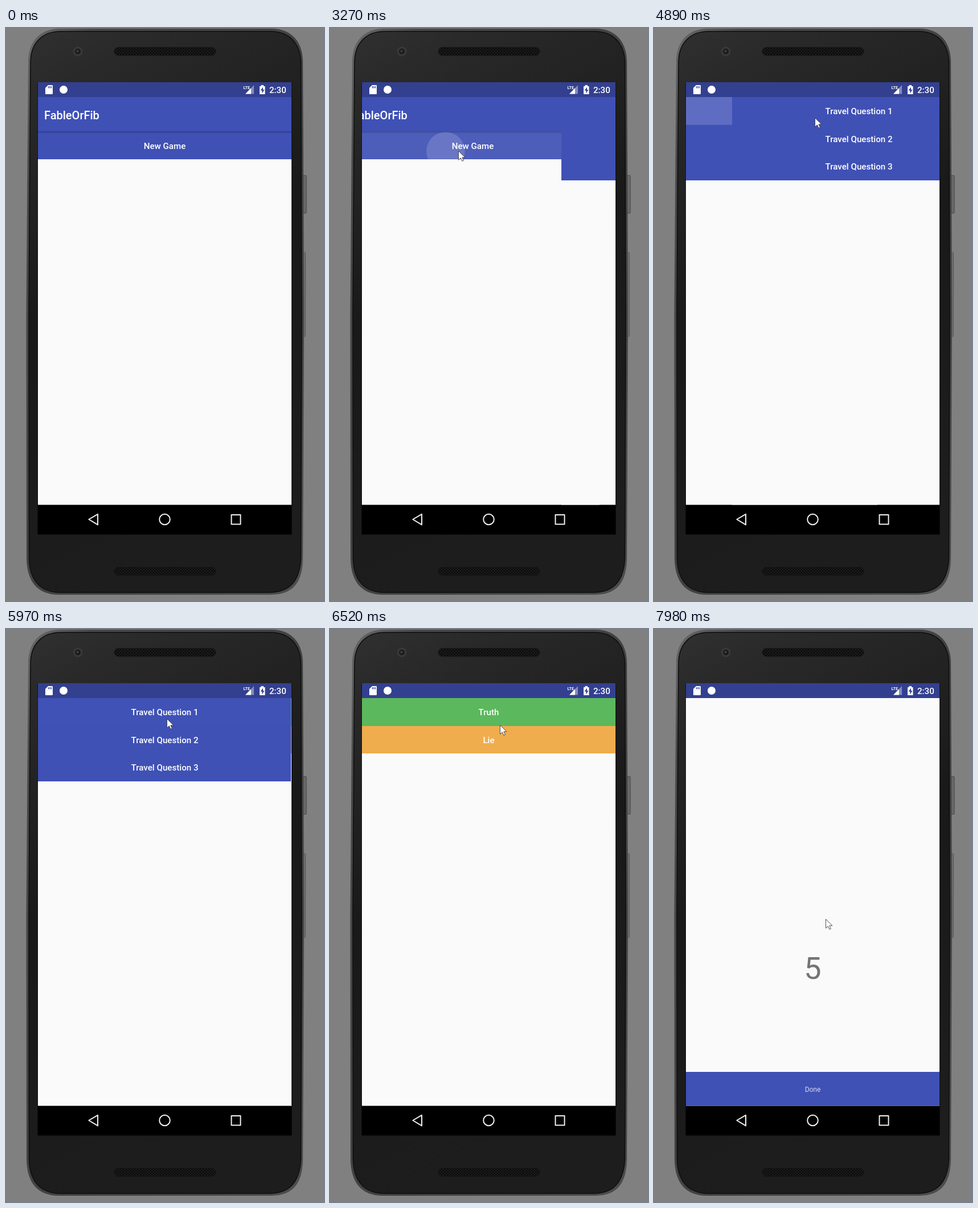
These frames come from a looping animation (558 px wide and 1004 px high, 8000 ms). An HTML page:

```html
<!DOCTYPE html>
<html lang="en">
<head>
<meta charset="utf-8">
<title>Quiz app</title>
<style>
html, body { margin: 0; width: 100%; height: 100%; overflow: hidden; background: #808080; }
svg { display: block; width: 558px; height: 1004px; }
text { font: 500 15.14px Roboto, sans-serif; fill: #fff; }
.mid { text-anchor: middle; }
.title { font-size: 20px; }
.count { font-size: 54px; font-weight: 400; fill: #737378; }
.done { font-size: 12px; font-weight: 400; fill: #d3d7ef; }
.lte { font-size: 7px; font-weight: 700; }
#pages rect { shape-rendering: crispEdges; }
</style>
</head>
<body>
<svg viewBox="0 0 558 1004">
  <defs>
    <linearGradient id="rim" x2="1" y2="1">
      <stop stop-color="#6a6a6a"/><stop offset=".12" stop-color="#484848"/>
      <stop offset=".6" stop-color="#404040"/><stop offset="1" stop-color="#4c4c4c"/>
    </linearGradient>
    <linearGradient id="face" x2=".25" y2="1">
      <stop stop-color="#303030"/><stop offset=".12" stop-color="#292929"/>
      <stop offset=".5" stop-color="#191919"/><stop offset="1" stop-color="#1d1d1d"/>
    </linearGradient>
    <linearGradient id="shade" x2="0" y2="1">
      <stop stop-opacity=".26"/><stop offset="1" stop-opacity="0"/>
    </linearGradient>
    <pattern id="mesh" width="5" height="5" patternUnits="userSpaceOnUse">
      <rect width="5" height="5" fill="#1c1c1c"/>
      <circle cx="1.2" cy="1.2" r="1.2" fill="#050505"/><circle cx="3.7" cy="3.7" r="1.2" fill="#050505"/>
    </pattern>
    <clipPath id="view"><rect x="56" y="121" width="445" height="714.5"/></clipPath>
  </defs>

  <g id="phone">
    <rect x="521" y="258.500" width="6" height="66" rx="1" fill="#686868" stroke="#484848"/>
    <rect x="521" y="393.500" width="4.500" height="147" rx="1" fill="#707070" stroke="#585858"/>
    <path d="M39 60C39 25 58 1 95 1H465C502 1 521 25 521 60L523 500 521 930C520 970 505 993 465 993H93C55 993 37 970 36 930L35.500 500Z" fill="url(#rim)"/>
    <path d="M43 61C43 28 62 6 96 6H464C498 6 517 28 517.500 61L519 500 517.500 928C516 965 500 989 463 989H95C58 989 41 965 40.500 928L40 500Z" fill="url(#face)" stroke="#0d0d0d" stroke-width="1.500"/>
    <g fill="url(#mesh)" stroke="#121212">
      <rect x="190" y="34" width="178" height="14" rx="7"/>
      <rect x="190" y="945" width="178" height="14" rx="7"/>
    </g>
    <circle cx="126" cy="41" r="8.500" fill="#383838"/>
    <circle cx="126" cy="41" r="5" fill="#1c1c1c"/>
    <circle cx="125.500" cy="40.500" r="2" fill="#404040"/>
    <rect x="55.500" y="95" width="446" height="792.500"/>
  </g>

  <g id="status" fill="#fff">
    <rect x="56" y="95" width="445" height="26" fill="#33408f"/>
    <path d="M74 100H81Q82 100 82 101V115Q82 116 81 116H70Q69 116 69 115V105Z"/>
    <path d="M74.500 102V105.500M77 102V105.500M79.500 102V105.500" stroke="#33408f" stroke-width="1.300"/>
    <circle cx="101" cy="108" r="7"/>
    <text class="lte" x="416.500" y="107">LTE</text>
    <path d="M435 100V115.500H420Z" opacity=".4"/>
    <path d="M430 105.200V115.500H420Z"/>
    <path d="M445 102H447.500V100H452V102H454.500V116H445Z"/>
    <path d="M451 103.500 446.500 109.500H449.300V114.500L453.500 108.300H451Z" fill="#33408f"/>
    <text x="462" y="114">2:30</text>
  </g>

  <g id="pages" clip-path="url(#view)"></g>

  <g fill="none" stroke="#f0f0f0" stroke-width="2" stroke-linejoin="round">
    <path d="M145.300 861 161 851.800V870.400Z"/>
    <circle cx="278.500" cy="861" r="9.300"/>
    <rect x="395.500" y="853" width="16" height="16.500"/>
  </g>
  <path id="cursor" d="M.5.5V16.300L4.300 12.700 6.900 18.300 9.400 17.200 6.900 11.800H12Z" fill="#fff" stroke="#333" stroke-width=".85"/>
</svg>

<script>
const LOOP = 8000, LEFT = 56, WIDTH = 445, TOP = 121, BAR = 181, ROW = 48.67, MIDDLE = 278.5;
const BLUE = '#3f51b5', GREEN = '#5cb85c', ORANGE = '#f0ad4e';
const $ = id => document.getElementById(id);

// The screen refreshes only in these spans: [first, last, count].
const spans = [[90, 250, 3], [2110, 2420, 5], [2650, 2960, 5], [3270, 3730, 7],
  [3960, 4430, 7], [4680, 5130, 7], [5970, 6750, 11], [6840, 6910, 2],
  [7150, 7750, 9], [7980, 7980, 1]];

// Pointer path: [time, x, y].
const path = [[90, 388, 836], [170, 316, 676], [250, 268, 587],
  [2110, 288, 527], [2265, 218, 355], [2420, 163, 259],
  [2650, 174, 252], [2805, 209, 229], [2960, 222, 218],
  [3960, 232, 209], [4200, 280, 158], [4430, 282, 157],
  [6440, 282, 157], [6516, 298, 168], [6594, 311, 184], [6750, 323, 201],
  [6840, 323, 202], [6910, 323, 203],
  [7600, 323, 203], [7675, 316, 300], [7750, 298, 439], [7980, 301, 508]];

// Each push: start time, touch point and the top of the touched row.
const pushes = [
  { start: 3218, x: 222, y: 218, row: BAR },
  { start: 4635, x: 282, y: 157, row: TOP },
  { start: 5968.5, x: 282, y: 157, row: TOP },
  { start: 7110, x: 323, y: 203, row: TOP + ROW }];

const box = (y, h, fill) =>
  `<rect x="${LEFT}" y="${y}" width="${WIDTH}" height="${h}" fill="${fill}"/>`;
const label = (text, y, cls = '') =>
  `<text class="mid ${cls}" x="${MIDDLE}" y="${Math.round(y)}">${text}</text>`;
const button = (text, y, fill = BLUE) => box(y, ROW, fill) + label(text, y + 30);
const list = (names, fills = []) =>
  names.map((name, i) => button(name, TOP + i * ROW, fills[i])).join('');

const contents = [
  button('New Game', BAR + .6) + box(TOP, BAR - TOP, BLUE) + box(BAR, 1, BLUE) + box(BAR, 4, 'url(#shade)') +
    '<text class="title" x="67" y="159.500">FableOrFib</text>',
  list(['Travel', 'Food', 'Hobby']),
  list(['Travel Question 1', 'Travel Question 2', 'Travel Question 3']),
  list(['Truth', 'Lie'], [GREEN, ORANGE]),
  label('5', 613, 'count') + box(775.5, 60, BLUE) + label('Done', 811, 'done')];

$('pages').innerHTML = contents.map((content, i) => {
  const push = pushes[i];
  const ripple = push ? `<clipPath id="row${i}">${box(push.row, ROW, BLUE)}</clipPath>
    <g clip-path="url(#row${i})">${box(push.row, ROW, '#fff')}<circle fill="#fff"/></g>` : '';
  return `<g>${box(TOP, 715, '#fafafa')}${content}${ripple}</g>`;
}).join('');

const pages = [...$('pages').children];
const ripples = pages.slice(0, -1).map(page => page.lastElementChild);

const clamp = v => Math.max(0, Math.min(1, v));
const mix = (a, b, k) => a + (b - a) * k;

function refreshTime(t) {
  let shown = 0;
  for (const [first, last, count] of spans) {
    if (t < first) break;
    const gap = (last - first) / (count - 1) || 1;
    shown = Math.min(last, first + Math.floor((t - first) / gap + 1e-6) * gap);
  }
  return shown;
}

// Damped spring (tension 200, friction 26, start speed 1.5), clamped at its goal.
function spring(s) {
  if (s <= 0) return 0;
  if (s >= .483) return 1;
  const w = Math.sqrt(31);
  return 1 - Math.exp(-13 * s) * (Math.cos(w * s) + 11.5 / w * Math.sin(w * s));
}

function pointer(t) {
  const i = path.findIndex(key => key[0] >= t - .01);
  const [tb, xb, yb] = path[i], [ta, xa, ya] = path[Math.max(0, i - 1)];
  const k = tb > ta ? clamp((t - ta) / (tb - ta)) : 1;
  return [Math.round(mix(xa, xb, k)), Math.round(mix(ya, yb, k))];
}

function drawRipple(group, push, s) {
  const [glow, circle] = group.children;
  const fade = clamp(s / .05) * clamp(1 - (s - .1) / .35);
  const k = clamp(s / .33);
  glow.setAttribute('opacity', .07 * fade);
  circle.setAttribute('opacity', .155 * fade);
  circle.setAttribute('cx', mix(push.x, MIDDLE, k));
  circle.setAttribute('cy', mix(push.y, push.row + ROW / 2, k));
  circle.setAttribute('r', Math.max(0, 650 * s));
}

function draw(now) {
  const t = refreshTime(now % LOOP);
  const ages = pushes.map(push => (t - push.start) / 1000);
  pages.forEach((page, i) => {
    const enter = i ? spring(ages[i - 1]) : 1;
    const leave = i < pushes.length ? spring(ages[i]) : 0;
    const shift = Math.round(WIDTH * (1 - enter) - .3 * WIDTH * leave);
    page.style.display = enter > 0 && leave < 1 ? '' : 'none';
    page.setAttribute('transform', `translate(${shift})`);
  });
  ripples.forEach((group, i) => drawRipple(group, pushes[i], ages[i]));
  $('cursor').style.display = t < 90 ? 'none' : '';
  $('cursor').setAttribute('transform', `translate(${pointer(t)})`);
}

const begin = performance.now();
function tick() {
  draw(performance.now() - begin);
  requestAnimationFrame(tick);
}
tick();
</script>
</body>
</html>
```
